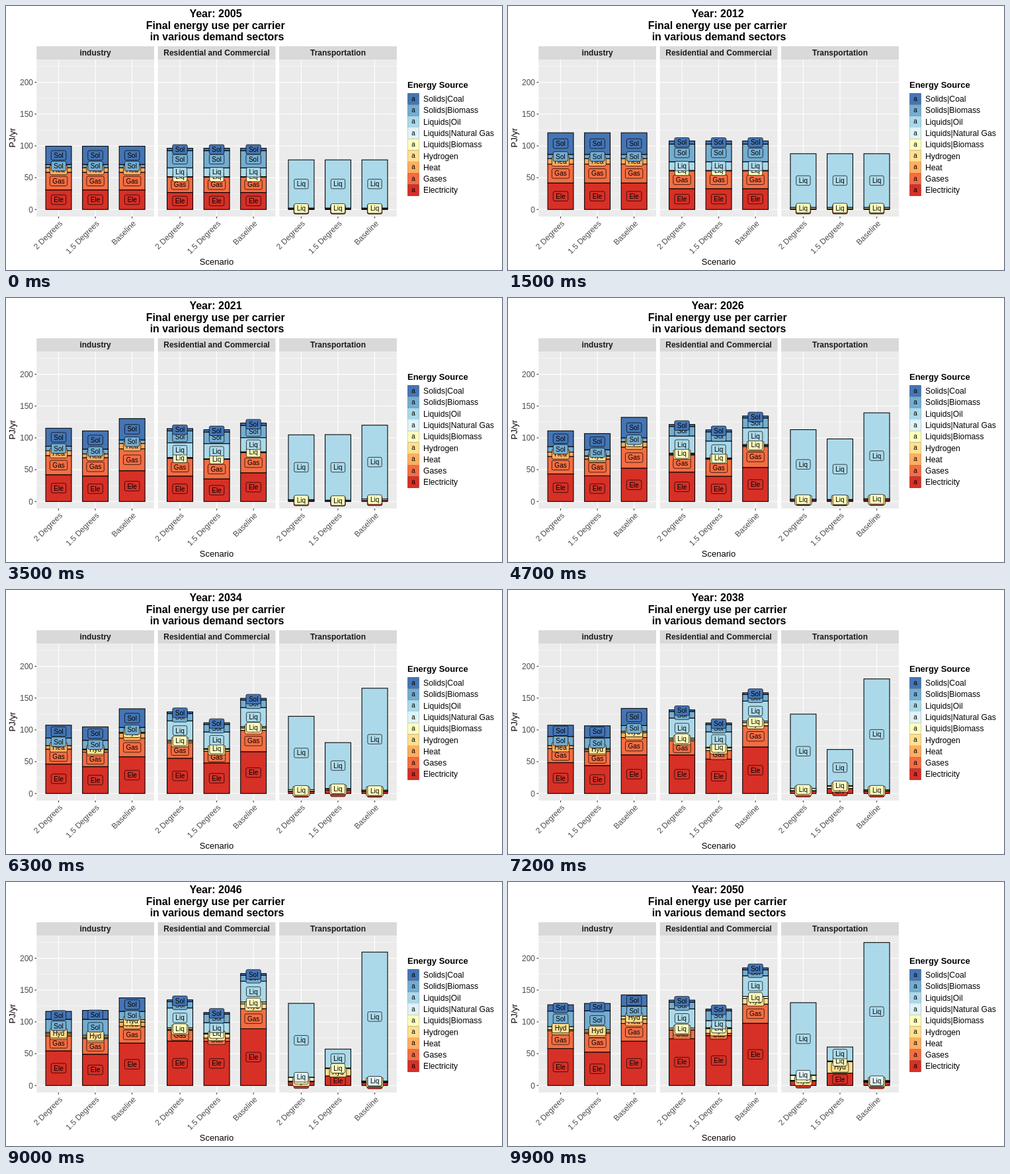
These frames come from a looping animation (750 px wide and 400 px high, 10000 ms). An HTML page:

```html
<!DOCTYPE html>
<html lang="en">
<head>
<meta charset="utf-8">
<title>Final energy use per carrier</title>
<style>
html, body { margin: 0; width: 100%; height: 100%; overflow: hidden; background: #fff; }
svg { display: block; width: 750px; height: 400px; font-family: "Liberation Sans", Arial, sans-serif; font-size: 12px; }
.mid { text-anchor: middle; }
.end { text-anchor: end; }
.title { font-size: 16px; font-weight: bold; }
.strip { font-weight: bold; fill: #1a1a1a; }
.axis { fill: #4d4d4d; }
.name { font-size: 13px; }
.label { font-size: 10px; text-anchor: middle; }
</style>
</head>
<body>
<svg id="stage" viewBox="0 0 750 400"></svg>
<script>
const STEP = 100, FRAMES = 100, KNOT = 11, SPLIT = 15;
const ZERO = 308.3, UNIT = 0.9635;
const PANEL = { top: 81, bottom: 319, width: 177.8 };
const SLOT = PANEL.width / 3.2, BAR = SLOT * 0.7, KEY = 17.28;
const SCENARIOS = ["2 Degrees", "1.5 Degrees", "Baseline"];

const FUELS = {
  coal: ["Solids|Coal", "#4575b4"],
  wood: ["Solids|Biomass", "#74add1"],
  oil: ["Liquids|Oil", "#abd9e9"],
  lng: ["Liquids|Natural Gas", "#e0f3f8"],
  bio: ["Liquids|Biomass", "#ffffbf"],
  hyd: ["Hydrogen", "#fee090"],
  heat: ["Heat", "#fdae61"],
  gas: ["Gases", "#f46d43"],
  ele: ["Electricity", "#d73027"]
};

// Per carrier: the shared first years as [start, split], then for each
// scenario the evenly spaced key points of a smooth curve from the split
// to the end. Below zero the carrier is not in use.
const sectors = [
  {
    title: "industry", x: 46.2,
    carriers: {
      ele: [[30.8, 41.7], [45, 58], [41.3, 52.5], [69.7]],
      gas: [[27.7, 29.7], [28.5, 22.2, 28], [27.3, 22.2, 29.5], [33.8, 27.5, 27.8]],
      heat: [[7.3, 8.7], [6, 2], [3.6, 2.3], [7]],
      hyd: [[-1, -1], [-2.5, 4.5], [3.2], [1, 4.5]],
      wood: [[4.9, 6.5], [10.5, 24.5], [12, 30], [7, 15.7]],
      coal: [[28.8, 34], [9.9], [11.5], [30.5, 17.7]]
    }
  },
  {
    title: "Residential and Commercial", x: 229.7,
    carriers: {
      ele: [[26.7, 32.7], [44, 60, 73.5], [44.5, 78.5], [61, 97.8]],
      gas: [[24.5, 28.1], [25.5, 13.7], [28.5, 14, 3.5], [33.5, 30.2]],
      hyd: [[-3, -3], [2, 0.4], [7.5], [8.8]],
      bio: [[0.4, 0.6], [2.7], [1.3], [3.2]],
      oil: [[13.9, 13.7], [29.5, 30.2], [26, 24.5, 11.2], [28.8, 32.5]],
      wood: [[27, 27.7], [12.5, 10.5], [12.5, 15.5], [13, 9.5]],
      coal: [[3.8, 5], [2.8, 3.2], [2.8, 2.7], [2.8, 3]]
    }
  },
  {
    title: "Transportation", x: 413.1,
    carriers: {
      ele: [[0.8, 1], [2.8, 7], [3.7, 19.5], [5]],
      hyd: [[-0.5, -0.5], [1], [0.1, 3.5, 18], [1]],
      bio: [[1.5, 2.3], [2, 8], [0.9, 1], [1.2]],
      lng: [[-3, -3], [0.5], [-3], [0.6]],
      oil: [[75.7, 84.4], [113.5, 113.7], [99, 58.5, 22], [217]]
    }
  }
];

const stage = document.getElementById("stage");

function add(tag, attrs, text) {
  const el = document.createElementNS("http://www.w3.org/2000/svg", tag);
  for (const key in attrs) el.setAttribute(key, attrs[key]);
  if (text !== undefined) el.textContent = text;
  stage.appendChild(el);
  return el;
}
const rect = (x, y, width, height, fill, more) => add("rect", { x, y, width, height, fill, ...more });
const line = (x1, y1, x2, y2, stroke, width) => add("line", { x1, y1, x2, y2, stroke, "stroke-width": width });
const text = (x, y, cls, str, more) => add("text", { x, y, class: cls, ...more }, str);
const yOf = value => ZERO - value * UNIT;
const slotX = (sector, i) => sector.x + SLOT * (0.6 + i);
const outline = width => ({ stroke: "#000", "stroke-width": width });

// Polynomial through evenly spaced points, u from 0 to 1.
function curve(points, u) {
  const s = u * (points.length - 1);
  return points.reduce((sum, p, i) =>
    sum + points.reduce((term, _, j) => j === i ? term : term * (s - j) / (i - j), p), 0);
}

function amount({ early, late }, step) {
  return step < SPLIT
    ? curve(early, step / SPLIT)
    : curve([early[1], ...late], (step - SPLIT) / (FRAMES - 1 - SPLIT));
}

function drawPanel(sector) {
  const { title, x } = sector, right = x + PANEL.width;
  rect(x, 61, PANEL.width, PANEL.top - 61, "#d9d9d9");
  text(x + PANEL.width / 2, 75, "mid strip", title);
  rect(x, PANEL.top, PANEL.width, PANEL.bottom - PANEL.top, "#ebebeb");
  for (let v = 25; v <= 225; v += 50) line(x, yOf(v), right, yOf(v), "#fff", 0.55);
  for (let v = 0; v <= 200; v += 50) line(x, yOf(v), right, yOf(v), "#fff", 1.07);
  SCENARIOS.forEach((name, i) => {
    const cx = slotX(sector, i);
    line(cx, PANEL.top, cx, PANEL.bottom, "#fff", 1.07);
    line(cx, PANEL.bottom, cx, PANEL.bottom + 2.75, "#333", 1.07);
    text(0, 0, "end axis", name, { transform: `translate(${cx + 6.4} 330.3) rotate(-45)` });
  });
}

function drawLegend() {
  text(607, 124, "name", "Energy Source", { "font-weight": "bold" });
  Object.values(FUELS).forEach(([name, color], i) => {
    const x = 607.3, y = 132.2 + i * KEY;
    // The plain fill covers the outline, leaving only its soft edge.
    rect(x + 0.7, y + 0.7, KEY - 1.4, KEY - 1.4, color, outline(1.07));
    rect(x, y, KEY, KEY, color);
    text(x + KEY / 2, y + 11.6, "label", "a");
    text(631, y + 13, "", name, { style: "font-size:12.2px" });
  });
}

function makeBar(sector, index) {
  const cx = slotX(sector, index);
  const parts = Object.entries(sector.carriers).map(([key, [early, ...scenarios]]) => {
    const [name, color] = FUELS[key];
    return { early, late: scenarios[index], color, tag: name.slice(0, 3) };
  });
  for (const part of parts) {
    part.block = rect(cx - BAR / 2, 0, BAR, 0, part.color, outline(1.07));
  }
  for (const part of parts) {
    part.box = rect(0, 0, 0, 14.5, part.color, { rx: 2.2, ...outline(0.71) });
    part.label = text(cx, 0, "label", part.tag);
    const width = part.label.getComputedTextLength() + 8;
    part.box.setAttribute("x", cx - width / 2);
    part.box.setAttribute("width", width);
  }
  return parts;
}

function updateBar(parts, step) {
  let low = 0;
  for (const part of parts) {
    // A new carrier enters only at a five-year mark.
    const shown = amount(part, step - step % KNOT) > 0;
    const size = shown ? Math.max(0, amount(part, step)) : 0;
    const mid = yOf(low + size / 2);
    low += size;
    for (const el of [part.block, part.box, part.label]) {
      el.setAttribute("visibility", shown ? "visible" : "hidden");
    }
    part.block.setAttribute("y", yOf(low));
    part.block.setAttribute("height", size * UNIT);
    part.box.setAttribute("y", mid - 7.25);
    part.label.setAttribute("y", mid + 3.6);
  }
}

const year = text(317, 17, "mid title", "");
text(316.7, 35, "mid title", "Final energy use per carrier");
text(319, 52, "mid title", "in various demand sectors");
sectors.forEach(drawPanel);
for (let v = 0; v <= 200; v += 50) {
  line(43.4, yOf(v), 46.2, yOf(v), "#333", 1.07);
  text(41, yOf(v) + 4.3, "end axis", v);
}
text(0, 0, "mid name", "PJ/yr", { transform: "translate(14 199.7) rotate(-90)" });
text(318.5, 392, "mid name", "Scenario");
drawLegend();
const bars = sectors.flatMap(sector => SCENARIOS.map((_, i) => makeBar(sector, i)));

let last = -1;
const begin = performance.now();
function draw(now) {
  const step = Math.floor(Math.max(0, now - begin) / STEP) % FRAMES;
  if (step !== last) {
    last = step;
    year.textContent = "Year: " + Math.round(2005 + 45 * step / (FRAMES - 1));
    bars.forEach(bar => updateBar(bar, step));
  }
  requestAnimationFrame(draw);
}
draw(begin);
</script>
</body>
</html>
```
